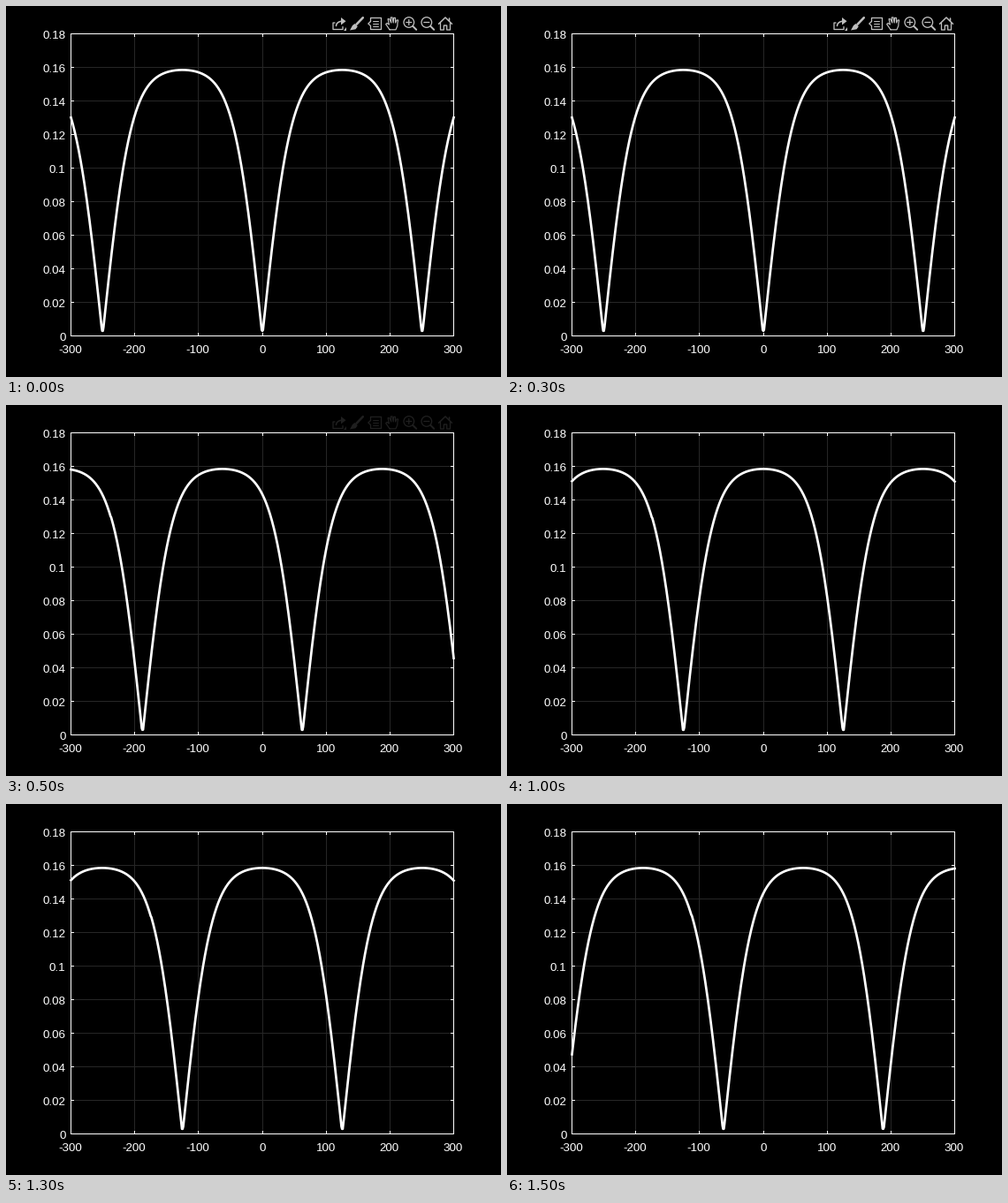
Recreate the animation shown at these times as a matplotlib script. Size 560 px wide and 420 px high, loop 2 s.

```python
import math

import matplotlib.pyplot as plt
import numpy as np
from matplotlib.animation import FuncAnimation
from matplotlib.patches import Circle, Polygon, Rectangle

W, H, DPI = 560, 420, 100
PX = 72 / DPI                      # points per pixel
LEFT, RIGHT, TOP, BOTTOM = 73, 506, 31, 373
TICK = 4
PERIOD, PEAK, FLOOR = 250.5, 0.1585, 0.003
SHARPNESS, SEAM = 1.55, 0.5
ICON_Y = 20

plt.rcParams["font.family"] = "Liberation Sans"
fig = plt.figure(figsize=(W / DPI, H / DPI), dpi=DPI, facecolor="black")
ax = fig.add_axes([0, 0, 1, 1])
ax.set_xlim(0, W)
ax.set_ylim(H, 0)
ax.axis("off")


def to_x(v):
    return LEFT + 0.5 + (v + 300) / 600 * (RIGHT - LEFT)


def to_y(v):
    return BOTTOM + 0.5 - v / 0.18 * (BOTTOM - TOP)


def line(xs, ys, color="white", width=1, z=2, cap="butt", **kw):
    return ax.plot(xs, ys, color=color, lw=width * PX, zorder=z, snap=False,
                   solid_capstyle=cap, clip_on=False, **kw)[0]


def label(x, y, text, ha):
    ax.text(x, y, text, color="white", fontsize=13.4 * PX, ha=ha, va="baseline")


erf = np.vectorize(math.erf)


def wave(x, shift):
    u = x - shift
    u = np.where(u < -300, u + SEAM, u)   # slight seam where the wave enters
    s = np.abs(np.sin(np.pi * u / PERIOD))
    return np.maximum(FLOOR, PEAK * erf(SHARPNESS * s) / math.erf(SHARPNESS))


def draw_axes():
    for v in range(-300, 301, 100):
        x = int(to_x(v)) + 0.5
        line([x, x], [TOP, BOTTOM + 1], "#262626", z=1)
        line([x, x], [TOP, TOP + TICK])
        line([x, x], [BOTTOM + 1 - TICK, BOTTOM + 1])
        label(x - 0.6, 393.2, str(v), "center")
    for v in np.linspace(0, 0.18, 10):
        y = int(to_y(v)) + 0.5
        line([LEFT, RIGHT + 1], [y, y], "#262626", z=1)
        line([LEFT, LEFT + TICK], [y, y])
        line([RIGHT + 1 - TICK, RIGHT + 1], [y, y])
        label(67.5, y + 5.4, f"{v:.2g}", "right")
    ax.add_patch(Rectangle((LEFT + 0.5, TOP + 0.5), RIGHT - LEFT, BOTTOM - TOP,
                           fill=False, ec="white", lw=PX, zorder=2, snap=False))


class Icon:
    """Line drawing around one toolbar slot."""
    parts = []

    def __init__(self, slot):
        self.x = 377 + 20 * slot

    def stroke(self, *pts, width=1.3):
        xs, ys = np.transpose(pts) + [[self.x], [ICON_Y]]
        self.parts.append(line(xs, ys, width=width, cap="round"))

    def shape(self, *pts):
        self.parts.append(ax.add_patch(
            Polygon(np.add(pts, (self.x, ICON_Y)), lw=0, zorder=2)))

    def ring(self, x, y, r):
        self.parts.append(ax.add_patch(
            Circle((self.x + x, ICON_Y + y), r, fill=False, lw=1.3 * PX, zorder=2)))


def draw_export(icon):
    icon.stroke((-5, -1), (-7, -1), (-7, 6.5), (4, 6.5), (4, 3.5))
    a = np.linspace(np.pi, 1.5 * np.pi, 8)
    icon.stroke(*zip(3 + 6.5 * np.cos(a), 2.5 + 5.2 * np.sin(a)), width=1.6)
    icon.shape((2, -7), (7.5, -2.8), (2, 1.5))
    icon.shape((8, 3.5), (8, 7.5), (4.5, 7.5))


def draw_brush(icon):
    icon.stroke((6.8, -6.8), (-0.5, 0.8), width=2.6)
    icon.shape((-2.5, 0), (0.8, 3.2), (-1.5, 6.3), (-8, 7.5), (-5, 2))


def draw_tip(icon):
    icon.stroke((-4.5, -2.5), (-4.5, -6.5), (7.5, -6.5), (7.5, 6.5),
                (-4.5, 6.5), (-4.5, 2.5), (-7.2, 0), (-4.5, -2.5))
    for y in (-2.5, 0.5, 3.5):
        icon.stroke((-1.5, y), (4.5, y), width=1)


def draw_hand(icon):
    outline = [(-3, 6.8), (-7.3, 0.6), (-6, -0.6), (-3.6, 1)]
    for k in range(4):
        tip = -7.2 + 1.1 * (k - 1.3) ** 2
        lean = 0.9 * (k - 1.5)
        x = -3.6 + 2.4 * k
        outline += [(x + lean, tip), (x + lean + 1.7, tip), (x + 2.4, -1)]
    outline += [(5.8, 2.5), (4, 6.8), (-3, 6.8)]
    icon.stroke(*outline, width=1.2)


def draw_zoom(icon, plus):
    icon.ring(-1.2, -1.5, 5.8)
    icon.stroke((-4.2, -1.5), (1.8, -1.5))
    if plus:
        icon.stroke((-1.2, -4.5), (-1.2, 1.5))
    icon.stroke((3.2, 2.8), (7.2, 6.8), width=2)


def draw_home(icon):
    icon.stroke((-7.5, 0.3), (0, -7), (7.5, 0.3), width=1.5)
    for side in (-1, 1):
        icon.stroke((5.5 * side, -0.5), (5.5 * side, 7), (1.7 * side, 7),
                    (1.7 * side, 2), (0, 2))
    icon.stroke((4.5, -6), (4.5, -3.5), width=1.6)


def draw_toolbar():
    draw_export(Icon(0))
    draw_brush(Icon(1))
    draw_tip(Icon(2))
    draw_hand(Icon(3))
    draw_zoom(Icon(4), True)
    draw_zoom(Icon(5), False)
    draw_home(Icon(6))


draw_axes()
draw_toolbar()
grid = np.arange(-300, 301.0)
curve = line(to_x(grid), to_y(wave(grid, 0)), width=2.7, z=3, cap="projecting",
             solid_joinstyle="round")


def update(i):
    curve.set_ydata(to_y(wave(grid, i * PERIOD / 4)))
    # The toolbar dims, then vanishes
    for part in Icon.parts:
        part.set_visible(i < 2)
        part.set_color("#1f1f1f" if i else "#bebebe")
    return [curve, *Icon.parts]


anim = FuncAnimation(fig, update, frames=4, interval=500, repeat=True,
                     repeat_delay=0)
plt.show()
```
